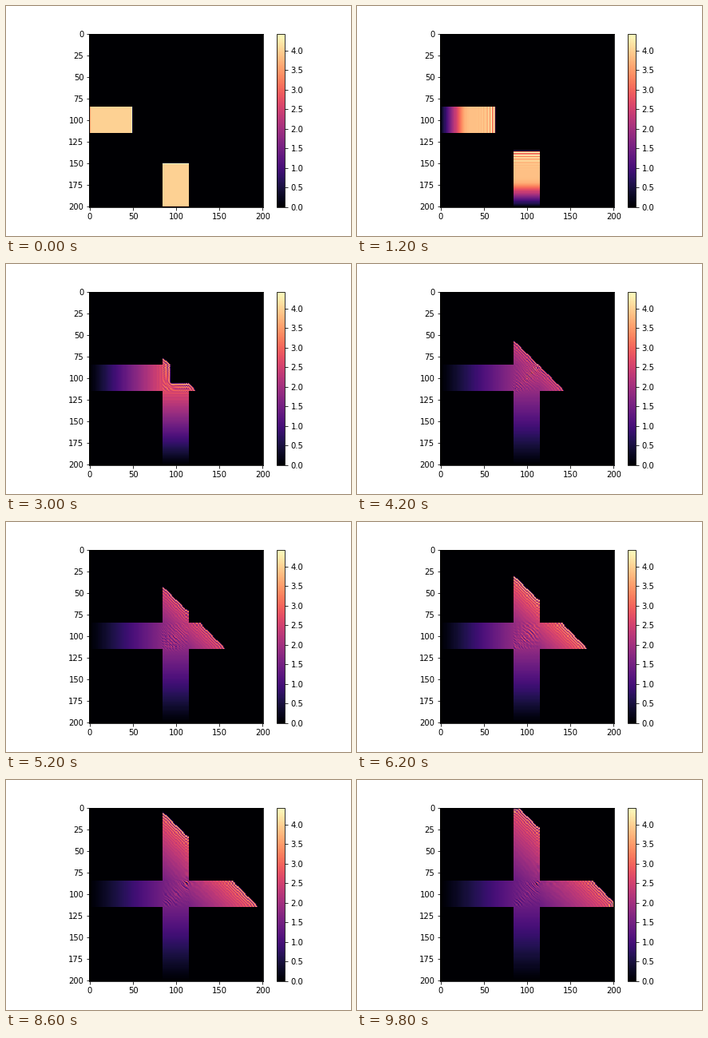
These frames come from a looping animation (432 px wide and 288 px high, 10000 ms). A matplotlib script:

```python
import numpy as np
import matplotlib.pyplot as plt
from matplotlib.animation import FuncAnimation
from matplotlib.cm import ScalarMappable
from matplotlib.colors import Normalize

SIZE = 201
FRAMES = 50
DT = 0.05
BAND = slice(85, 115)

# frame number, simulated time, brightness ceiling
KEYS = np.array([
    (0, 0.1, 4.43), (6, 7.0, 4.6), (15, 21.8, 6.4), (21, 32.2, 6.4),
    (31, 49.2, 4.2), (37, 59.5, 3.8), (49, 77.0, 3.6),
])


def at_frames(column):
    return np.interp(np.arange(FRAMES), KEYS[:, 0], KEYS[:, column])


def start_field():
    u = np.zeros((SIZE, SIZE))
    u[BAND, :50] = 4
    u[150:, BAND] = 4
    return u


def close_edges(u):
    u[0] = u[-1] = 0
    u[:, 0] = u[:, -1] = 0
    return np.clip(u, 0, 8, out=u)


def step(u):
    """One MacCormack step: rightward flow in the row band, upward in the column band."""
    f = u * u / 2
    p = u.copy()
    p[BAND, :-1] -= DT * np.diff(f[BAND], axis=1)
    p[:-1, BAND] += DT * np.diff(f[:, BAND], axis=0)
    close_edges(p)
    f = p * p / 2
    q = u + p
    q[BAND, 1:] -= DT * np.diff(f[BAND], axis=1)
    q[1:, BAND] += DT * np.diff(f[:, BAND], axis=0)
    return close_edges(q / 2)


def simulate():
    fields, u, done = [], start_field(), 0
    for target in np.rint(at_frames(1) / DT).astype(int):
        while done < target:
            u = step(u)
            done += 1
        fields.append(u)
    return fields


fields = simulate()
ceilings = at_frames(2)

plt.rcParams["font.family"] = "DejaVu Sans"
fig, ax = plt.subplots(figsize=(6, 4), dpi=72)
fig.subplots_adjust(left=0.125, right=0.9, bottom=0.125, top=0.88)
image = ax.imshow(fields[0], cmap="magma", vmin=0, vmax=ceilings[0],
                  interpolation="nearest")
ax.set_xticks(range(0, 201, 50))
ax.set_yticks(range(0, 201, 25))
scale = ScalarMappable(Normalize(0, 4.43), "magma")
fig.colorbar(scale, ax=ax, ticks=np.arange(0, 4.5, 0.5))


def draw(n):
    image.set_data(fields[n])
    image.set_clim(0, ceilings[n])
    return [image]


anim = FuncAnimation(fig, draw, frames=FRAMES, interval=200, repeat=True,
                     repeat_delay=0, blit=False)
plt.show()
```
